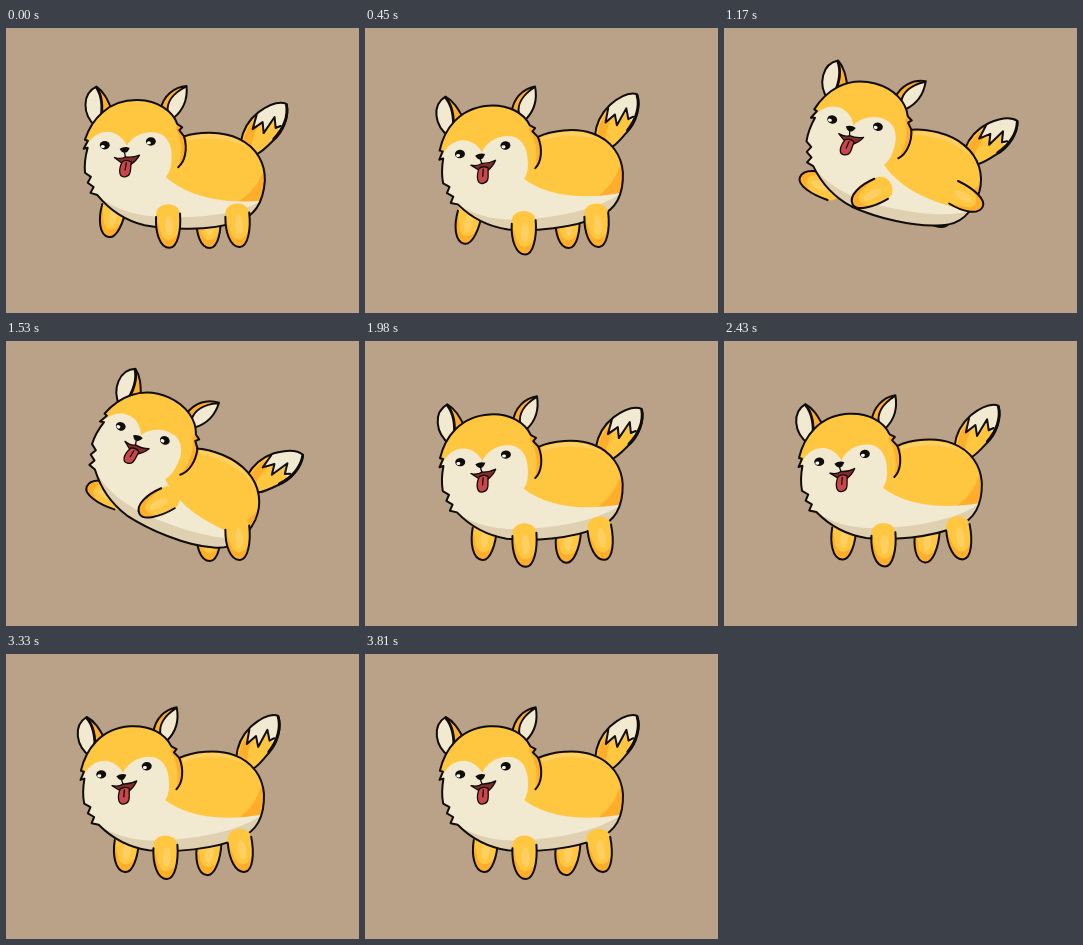
An HTML page for the animation above (3840 ms loop, 353 by 285 pixels).

```html
<!DOCTYPE html>
<html lang="en">
<head>
<meta charset="utf-8">
<title>Galloping fox</title>
<style>
  html, body { margin: 0; width: 100%; height: 100%; overflow: hidden; background: #b9a288; }
  svg { display: block; width: 100%; height: 100%; }
  .line { fill: none; stroke: #100c08; stroke-width: 2; stroke-linecap: round; stroke-linejoin: round; }
  .thick { stroke-width: 2.8; }
  .thin { stroke-width: 1.3; }
  .gold { fill: #ffc640; }
  .orange { fill: #ffae2b; }
  .light { fill: #ffcf62; }
  .cream { fill: #f1e9d0; }
  .shade { fill: #dfd0b2; }
  .ink { fill: #100c08; }
  .mouth { fill: #842b2d; }
  .tongue { fill: #ca464b; }
</style>
</head>
<body>
<svg viewBox="0 0 353 285">
  <defs>
    <path id="torso" d="M130 71C150 71 165 81 170 94L175 97L172 100L177 106C190 101 215 99 232 107C250 115 259 131 259 148C258 172 248 185 232 190C205 200 165 200 140 196C118 191 104 181 92 167L85 165L88 159L82 155L85 149L79 145C78 137 79 128 81 120L77 121L81 113L78 112C84 92 100 71 130 71Z"/>
    <clipPath id="inside"><use href="#torso"/></clipPath>
    <!-- The foot is at the origin, the hip above it. -->
    <g id="leg">
      <path class="gold" d="M-12-33C-12-47 12-47 12-33C13-18 9 0 1 0C-9 0-13-18-12-33Z"/>
      <path class="orange" d="M-11-28C-12-14-9 0 1 0C6 0 10-8 11-17C7-7-3-4-7-14Z"/>
      <ellipse class="light" cx="1" cy="-22" rx="4" ry="10"/>
      <path class="line" d="M-12-31C-13-16-9 0 1 0C9 0 13-17 12-34"/>
    </g>
    <g id="eye">
      <ellipse class="ink" rx="5" ry="4.2"/>
      <ellipse cx="-2" cy="1.3" rx="2" ry="1.6" fill="#fff"/>
    </g>
  </defs>

  <use id="frontFar" href="#leg"/>
  <use id="backFar" href="#leg"/>

  <g id="body">
    <g id="tail">
      <path class="gold" d="M234 112C236 98 243 87 252 80C262 73 273 69 280 72C283 84 277 100 266 109C260 115 255 120 248 124Z"/>
      <path class="orange" d="M236 112C238 100 243 92 248 88L246 96L252 93C247 102 245 110 244 119Z"/>
      <path class="cream" d="M250 82C259 75 272 69 280 72C283 83 278 94 274 99L269 96L268 85L257 101L256 90L246 97Z"/>
      <path class="line" d="M250 83L246 97L256 90L257 101L268 85L269 96L274 94"/>
      <path class="line" d="M234 110C236 98 243 87 252 80C262 73 273 69 280 72C283 84 277 100 266 109C260 115 255 120 250 122"/>
      <path class="line thick" d="M280 73C282 84 277 97 267 107"/>
    </g>
    <g id="earLeft">
      <path class="orange" d="M88 98C75 85 76 64 91 58C99 64 102 74 105 84Z"/>
      <path class="cream" d="M88 98C75 85 76 64 91 58C97 69 96 82 93 95Z"/>
      <path class="line" d="M88 98C75 85 76 64 91 58C99 64 102 74 105 82"/>
      <path class="line thick" d="M91 59C97 69 96 81 93 93"/>
    </g>
    <g id="earRight">
      <path class="orange" d="M153 80C156 66 166 57 179 56C180 68 176 80 165 90Z"/>
      <path class="cream" d="M160 84C159 72 167 62 179 56C180 68 176 80 166 88Z"/>
      <path class="line" d="M153 79C156 66 166 57 179 56C180 68 176 80 166 88M178 57C166 63 159 72 160 82"/>
    </g>

    <use href="#torso" class="gold"/>
    <g clip-path="url(#inside)">
      <path class="light" d="M178 108C198 100 224 101 241 115C222 107 198 105 179 111Z"/>
      <path class="orange" d="M262 122C257 146 248 160 232 170L262 174Z"/>
      <path class="orange" d="M171 94L180 108C180 124 178 132 172 137C176 122 175 108 168 98Z"/>
      <path class="cream" d="M76 132C78 112 92 101 105 104C113 106 118 112 120 117C126 106 140 100 153 104C162 108 166 118 165 130C165 138 163 143 160 147C175 160 205 174 258 168V210H70Z"/>
      <path class="shade" d="M96 170C120 187 150 188 175 187C205 186 240 180 258 167V210H96Z"/>
    </g>
    <use href="#torso" class="line"/>
    <path class="line" d="M177 106C181 118 179 131 172 137"/>

    <use href="#eye" x="98" y="117"/>
    <use href="#eye" x="144" y="112"/>
    <path class="ink" d="M113 120Q118 117 123 119Q121 124 118 124Q115 124 113 120Z"/>
    <g class="line thin">
      <path class="mouth" d="M108 129Q115 131 119 128Q126 129 133 126Q130 132 124 136L115 134Z"/>
      <path class="tongue" d="M116 133C112 141 113 149 119 148C126 147 124 140 125 133Q120 130 116 133Z"/>
      <path d="M118 124L119 128M120 134L119 141"/>
    </g>
  </g>

  <use id="frontNear" href="#leg"/>
  <use id="backNear" href="#leg"/>
</svg>

<script>
const STEP = 30, LOOP = 3840, CYCLE = 480, GALLOP_END = 4 * CYCLE;
const get = id => document.getElementById(id);

function smooth(from, to, t) {
  const u = Math.min(1, Math.max(0, (t - from) / (to - from)));
  return u * u * (3 - 2 * u);
}

// Eases from 0 to 1 and back once per cycle; a rise may begin before the cycle does.
function pulse(phase, riseFrom, riseTo, fallFrom, fallTo) {
  const t = phase >= riseFrom + CYCLE ? phase - CYCLE : phase;
  return smooth(riseFrom, riseTo, t) - smooth(fallFrom, fallTo, t);
}

// Feet are [x, y, leg angle]; the front ones travel with the head.
function gallop(phase) {
  const rear = pulse(phase, -40, 90, 130, 350);
  const lift = pulse(phase, -40, 90, 150, 440);
  const reach = pulse(phase, 0, 90, 270, 450);
  const kick = pulse(phase, 90, 270, 360, 450);
  const x = 115 + 16 * rear, y = 130 - 32 * lift;
  return {
    x, y, tilt: -5 + 29 * rear, tail: -1 - 4 * rear, ear: -5,
    feet: {
      frontFar: [x - 17 - 33 * reach, y + 86 - 39 * reach, 12 + 99 * reach],
      frontNear: [x + 44 - 42 * reach, y + 97 - 23 * reach, -1 + 64 * reach],
      backFar: [203 + 29 * kick, 220 - 32 * kick, -1 - 69 * kick],
      backNear: [233 + 34 * kick, 219 - 53 * kick, -3 - 79 * kick]
    }
  };
}

function idle(phase) {
  const sag = pulse(phase, -30, 225, 225, 450);
  return {
    x: 115.5, y: 124 + 3.5 * sag, tilt: -4 + 3 * sag, tail: -2 + 17 * sag, ear: -6 + 4 * sag,
    feet: {
      frontFar: [118 - 6 * sag, 218 + 3 * sag, 5 + 4 * sag],
      frontNear: [160, 225 + 3 * sag, -1],
      backFar: [200, 221 + 2 * sag, 6 + 4 * sag],
      backNear: [238 + 4 * sag, 218 + 3 * sag, -8 - 2 * sag]
    }
  };
}

function place(id, x, y, angle, pivotX = 0, pivotY = 0) {
  get(id).setAttribute("transform",
    `translate(${x} ${y}) rotate(${angle}) translate(${-pivotX} ${-pivotY})`);
}

const turn = (id, angle, x, y) => place(id, x, y, angle, x, y);

function draw(time) {
  const t = Math.floor(time % LOOP / STEP) * STEP;
  const pose = (t < GALLOP_END ? gallop : idle)(t % CYCLE);
  place("body", pose.x, pose.y, pose.tilt, 118, 122);
  turn("tail", pose.tail, 243, 115);
  turn("earLeft", pose.ear, 96, 92);
  turn("earRight", pose.ear / 3, 160, 84);
  for (const [id, foot] of Object.entries(pose.feet)) place(id, ...foot);
}

const start = performance.now();
function tick() {
  draw(performance.now() - start);
  requestAnimationFrame(tick);
}
tick();
</script>
</body>
</html>
```
